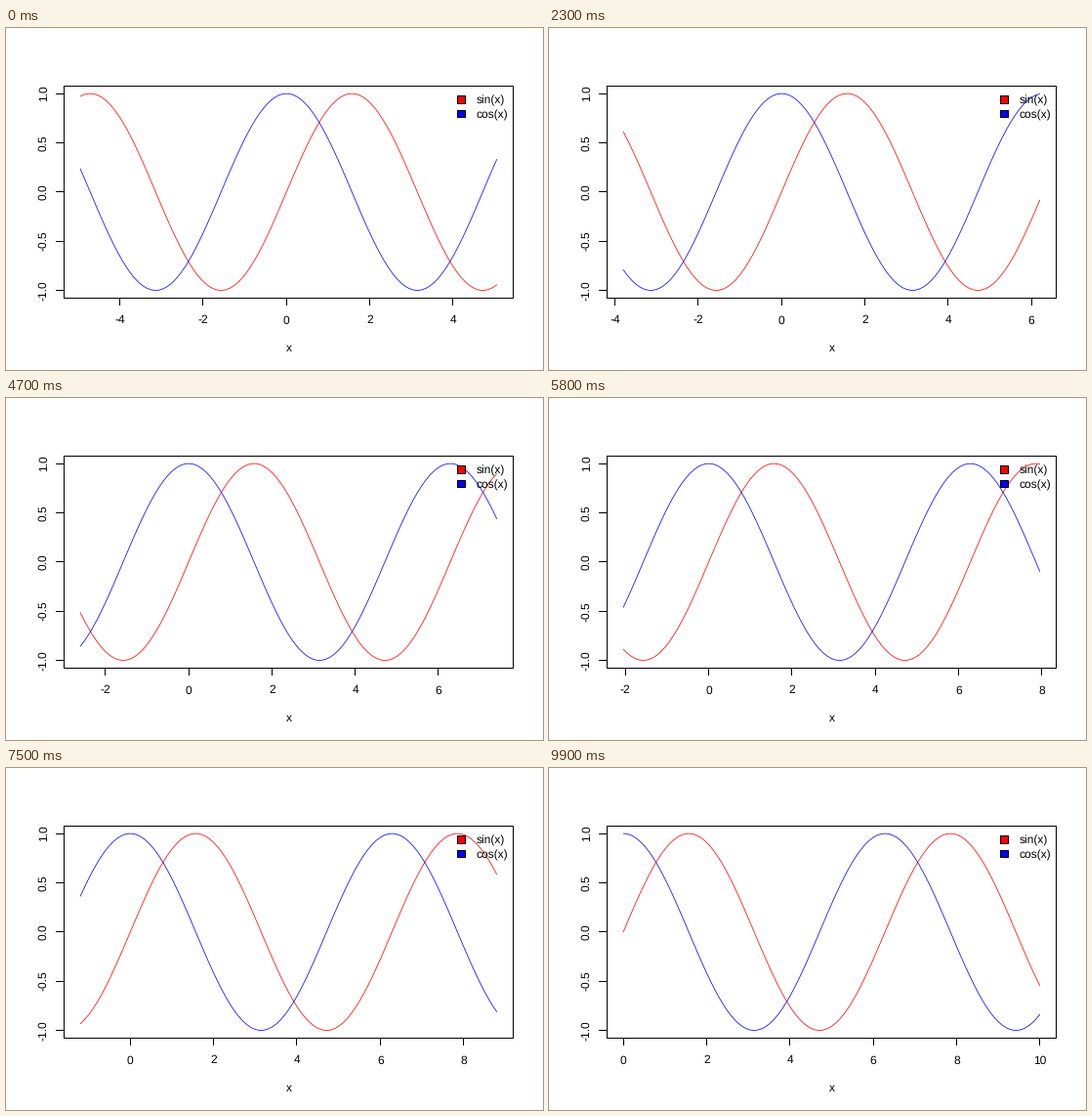
These frames come from a looping animation (550 by 350 pixels, 10 s). A matplotlib script:

```python
import numpy as np
import matplotlib.pyplot as plt
from matplotlib.animation import FuncAnimation
from matplotlib.patches import Rectangle

W, H, DPI = 550, 350, 100
FRAMES, INTERVAL = 100, 100
PX = 72 / DPI                       # points per pixel
LEFT, RIGHT, TOP, BOTTOM = 59.04, 519.76, 59.04, 276.56
PAD, TICK, SPAN = 0.04, 7.2, 10.0

plt.rcParams.update({
    "font.family": "Liberation Sans",
    "font.size": 12 * PX,
    "text.hinting": "none",
    "path.snap": False,
})

fig = plt.figure(figsize=(W / DPI, H / DPI), dpi=DPI, facecolor="white")
ax = fig.add_axes([0, 0, 1, 1])
ax.set_xlim(0, W)
ax.set_ylim(H, 0)
ax.axis("off")


def crisp(*values):
    """Move coordinates to pixel centres."""
    return np.floor(values) + 0.5


def rule(xs, ys):
    line, = ax.plot(crisp(*xs), crisp(*ys), color="black", lw=PX,
                    solid_capstyle="projecting", solid_joinstyle="miter")
    return line


def label(x, y, text, ha="center", rotation=0, z=3):
    return ax.text(x, y, text, ha=ha, va="baseline", rotation=rotation,
                   rotation_mode="anchor", color="black", zorder=z)


def curve(color):
    return ax.plot([], [], color=color, lw=0.75 * PX,
                   solid_capstyle="round", solid_joinstyle="round")[0]


def swatch(y, color, text):
    x0, x1, y0, y1 = crisp(462.25, 470.89, y - 3.6, y + 3.6)
    ax.add_patch(Rectangle((x0, y0), x1 - x0, y1 - y0, facecolor=color,
                           edgecolor="black", lw=PX, zorder=5))
    label(481.7, y + 4.3, text, ha="left", z=6)


sin_line, cos_line = curve("red"), curve("blue")
rule([LEFT, RIGHT, RIGHT, LEFT, LEFT], [TOP, TOP, BOTTOM, BOTTOM, TOP])
label((LEFT + RIGHT) / 2, 331.3, "x")
swatch(73.44, "red", "sin(x)")
swatch(87.84, "blue", "cos(x)")

x_ticks = [(v, rule([0, 0], [BOTTOM, BOTTOM + TICK]), label(0, 302.5, str(v)))
           for v in range(-4, 11, 2)]
y_ticks = [(v, rule([LEFT - TICK, LEFT], [0, 0]),
            label(41.8, 0, f"{v:.1f}", rotation=90))
           for v in (-1.0, -0.5, 0.0, 0.5, 1.0)]


def scale(lo, hi, start, end):
    """Map data to pixels with the padded data range filling the box."""
    pad = PAD * (hi - lo)
    return lambda v: start + (v - lo + pad) / (hi - lo + 2 * pad) * (end - start)


def update(i):
    lo = -SPAN / 2 + 0.05 * (i + 1)
    x = np.linspace(lo, lo + SPAN, 101)
    s = np.sin(x)
    to_x = scale(lo, lo + SPAN, LEFT, RIGHT)
    to_y = scale(s.min(), s.max(), BOTTOM, TOP)
    sin_line.set_data(to_x(x), to_y(s))
    cos_line.set_data(to_x(x), to_y(np.cos(x)))

    for v, mark, text in x_ticks:
        p = to_x(v)
        shown = LEFT - 1e-6 <= p <= RIGHT + 1e-6
        mark.set_xdata(crisp(p, p))
        text.set_x(p)
        mark.set_visible(shown)
        text.set_visible(shown)
    for v, mark, text in y_ticks:
        p = to_y(v)
        mark.set_ydata(crisp(p, p))
        text.set_y(p)
    return []


anim = FuncAnimation(fig, update, frames=FRAMES, interval=INTERVAL,
                     init_func=lambda: update(0), repeat=True,
                     repeat_delay=0, blit=False)
plt.show()
```
